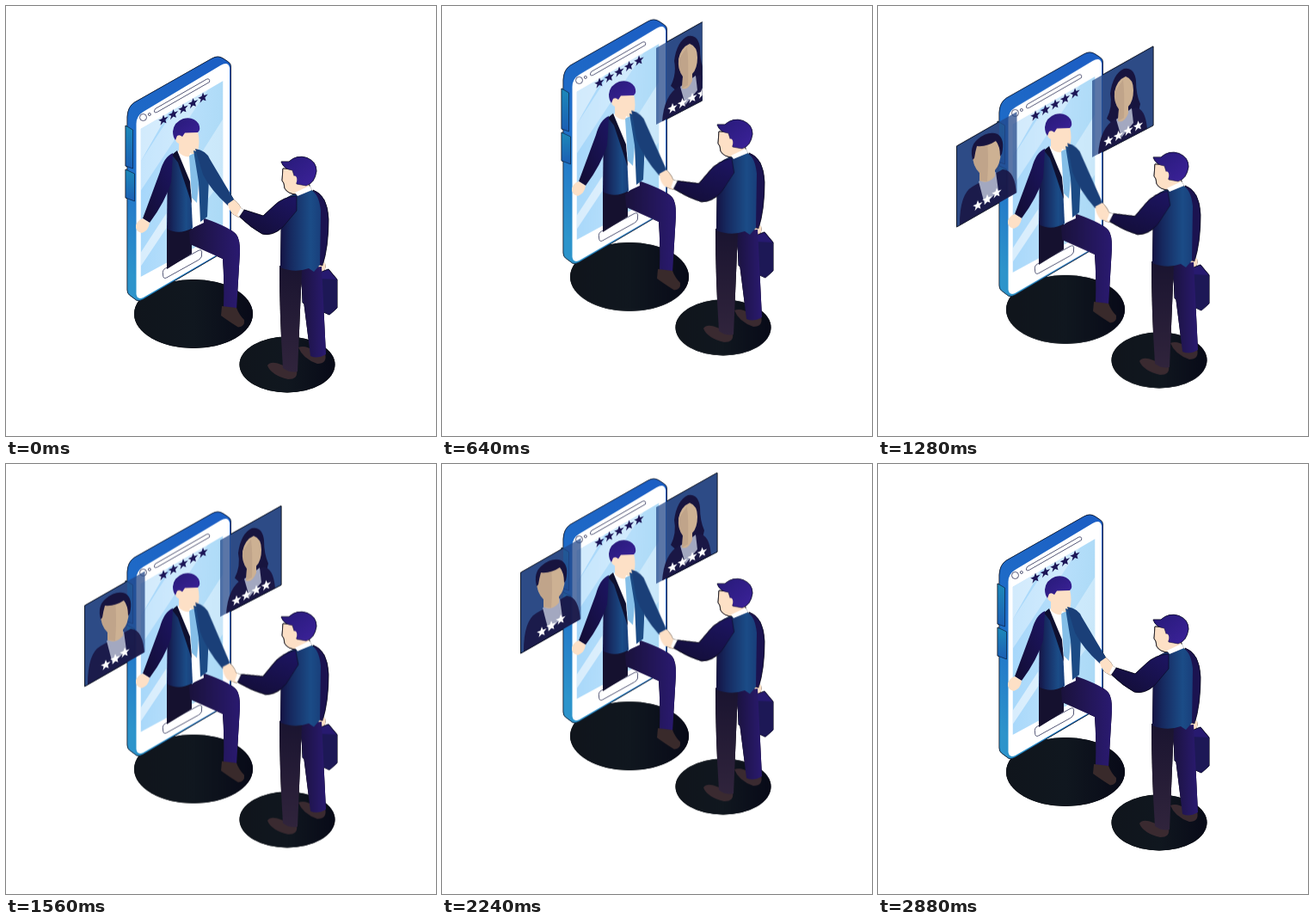
Write an HTML page that moves like this. It is 500 px wide and 500 px high and loops after 2.92 s.

```html
<!DOCTYPE html>
<html lang="en">
<head>
<meta charset="utf-8">
<title>Handshake through a phone</title>
<style>
html, body { margin: 0; width: 100%; height: 100%; overflow: hidden; background: #fff; }
.stage { position: absolute; left: 0; top: 0; width: 500px; height: 500px; filter: drop-shadow(0 0 .5px #000); }
svg { position: absolute; left: 0; top: 0; width: 500px; height: 500px; overflow: visible; }

.stage, .arm { animation: bob 2920ms cubic-bezier(.364, 0, .636, 1) infinite; }
.arm.near { animation-name: shakeNear; transform-origin: 228px 172px; }
.arm.far { animation-name: shakeFar; transform-origin: 332px 230px; }
.panel { animation: 2920ms linear infinite both; }
.panel.right { animation-name: wipeRight; }
.panel.left { animation-name: wipeLeft; }

@keyframes bob {
  0%, 49.315%, 98.63%, 100% { transform: translateY(0); }
  24.658%, 72.603% { transform: translateY(-44.5px); }
}
@keyframes shakeNear {
  0%, 32.877%, 65.753%, 98.63%, 100% { transform: rotate(0deg) scale(1); }
  16.438%, 49.315%, 82.192% { transform: rotate(9deg) scale(1.11); }
}
@keyframes shakeFar {
  0%, 32.877%, 65.753%, 98.63%, 100% { transform: rotate(0deg) scale(1); }
  16.438%, 49.315%, 82.192% { transform: rotate(-12.5deg) scale(1.12, 1); }
}
@keyframes wipeRight {
  0%, 14.384% { clip-path: inset(0 251px 0 0); animation-timing-function: ease-in-out; }
  26.027% { clip-path: inset(0 179px 0 0); }
  89.041% { clip-path: inset(0 179px 0 0); animation-timing-function: cubic-bezier(.33, 0, .67, .33); }
  98.63%, 100% { clip-path: inset(0 251px 0 0); }
}
@keyframes wipeLeft {
  0%, 24.658% { clip-path: inset(0 0 0 163px); animation-timing-function: ease-in-out; }
  35.616% { clip-path: inset(0 0 0 90px); }
  89.041% { clip-path: inset(0 0 0 90px); animation-timing-function: cubic-bezier(.33, 0, .67, .33); }
  98.63%, 100% { clip-path: inset(0 0 0 163px); }
}
</style>
</head>
<body>
<div class="stage">
<svg viewBox="0 0 500 500">
  <defs>
    <path id="star" transform="skewY(-20)" d="M0-6 1.5-2 5.7-1.9 2.4.8 3.5 4.9 0 2.5-3.5 4.9-2.4.8-5.7-1.9-1.5-2Z"/>
    <linearGradient id="body" x1=".7" y1="0" x2=".3" y2="1">
      <stop offset="0" stop-color="#1c5fc4"/><stop offset=".6" stop-color="#1f6ec8"/><stop offset="1" stop-color="#2d94cb"/>
    </linearGradient>
    <linearGradient id="button" x2="0" y2="1">
      <stop offset="0" stop-color="#1d8aba"/><stop offset="1" stop-color="#1b5eb4"/>
    </linearGradient>
    <linearGradient id="screen" x2="1" y2=".2">
      <stop offset="0" stop-color="#a0d4fa"/><stop offset=".6" stop-color="#b7dffb"/><stop offset="1" stop-color="#acdaf6"/>
    </linearGradient>
    <linearGradient id="coat">
      <stop offset="0" stop-color="#151344"/><stop offset=".25" stop-color="#16295f"/><stop offset=".75" stop-color="#1b4c87"/><stop offset="1" stop-color="#193f7b"/>
    </linearGradient>
    <linearGradient id="sleeve" x1="1" y1="0" x2="0" y2="1">
      <stop offset="0" stop-color="#1d1563"/><stop offset="1" stop-color="#120d33"/>
    </linearGradient>
    <linearGradient id="cloth">
      <stop offset="0" stop-color="#1a123c"/><stop offset="1" stop-color="#2a1a70"/>
    </linearGradient>
    <linearGradient id="trouser" x2="0" y2="1">
      <stop offset="0" stop-color="#1a1430"/><stop offset="1" stop-color="#30243c"/>
    </linearGradient>
    <linearGradient id="hair" x2="1" y2="1">
      <stop offset="0" stop-color="#271a78"/><stop offset="1" stop-color="#3c229a"/>
    </linearGradient>
    <linearGradient id="shade">
      <stop offset="0" stop-color="#10151c"/><stop offset=".5" stop-color="#10171f"/><stop offset="1" stop-color="#080a18"/>
    </linearGradient>
    <clipPath id="glass"><path d="M157 142 253 86V262L157 314Z"/></clipPath>
    <clipPath id="rightCard"><path d="M249 92 320 52V144L249 181Z"/></clipPath>
    <clipPath id="leftCard"><path d="M91.500 168 161.500 128V222L91.500 262Z"/></clipPath>
  </defs>

  <g fill="url(#shade)">
    <ellipse cx="218" cy="358" rx="69" ry="40"/>
    <ellipse cx="327" cy="417" rx="55.500" ry="32.500"/>
  </g>

  <!-- phone -->
  <g transform="translate(-.5 1)">
    <g stroke="#08142c" stroke-width=".6">
      <path fill="url(#body)" d="M141.500 128Q142 116 150 111L240 60Q247 56 253 60L259 64Q262 66 262 70V276Q262 280 257 283L160 340Q155 343 152 341L144 335Q141.500 333 141.500 329Z"/>
      <g fill="url(#button)">
        <path d="M139.500 138 148 143V188L139.500 185Z"/>
        <path d="M139.500 189 150 194V226L139.500 222Z"/>
      </g>
    </g>
    <path fill="#fff" d="M152 136Q152 127 160 122L250 68Q259 63 260.500 71V276Q260 281 255 283L160 338Q153 341 152 334Z"/>
    <g clip-path="url(#glass)">
      <path fill="url(#screen)" d="M150 80H260V320H150Z"/>
      <g fill="#fff">
        <path opacity=".5" d="M157 142 190 122 157 180Z"/>
        <path opacity=".35" d="M197 118 236 95 157 214V180ZM253 130V200L215 250V190Z"/>
        <path opacity=".55" d="M157 286 187 240V257L157 302Z"/>
      </g>
    </g>
    <g fill="#fff" stroke="#44486a" stroke-width=".9">
      <circle cx="160" cy="128.500" r="4"/>
      <circle cx="167.300" cy="125" r="1.500"/>
      <path d="M174 118.500 234 84Q238 83 237 87.500L176 122.500Q171 124 174 118.500Z"/>
      <path d="M183 311Q182 306 186 304L225 283Q229 282 228 287V290Q227 293 224 294.500L187 315Q183 317 183 311Z"/>
    </g>
    <g fill="#1b1556">
      <use href="#star" transform="translate(183.500 131.500)"/>
      <use href="#star" transform="translate(195 125)"/>
      <use href="#star" transform="translate(206.500 118.500)"/>
      <use href="#star" transform="translate(218 112)"/>
      <use href="#star" transform="translate(229.500 105.500)"/>
    </g>
  </g>

  <!-- man stepping out -->
  <path fill="#15112f" d="M187 255H216V288L187 306Z"/>
  <path fill="url(#cloth)" d="M213 262 231 247Q262 258 268 266Q272 271 272 286L268 353 253 350Q254 320 252 294L214 277Z"/>
  <path fill="#392a2b" d="M251 349 268 351Q271 359 277 365Q278 373 270 373.500Q258 366 250 360Z"/>
  <path fill="#fff" d="M198 170 206 165 222 172 230 252 217 258Z"/>
  <path fill="#85bfe8" d="M213 174 219 171 225 196 222 229 216 223Z"/>
  <path fill="#fde0c6" d="M197 151 206 145 223 146Q226 158 223 169Q219 174 214 171L213 175Q206 176 201 170L201 160Q196 158 197 151Z"/>
  <path fill="url(#hair)" d="M194 146Q195 135 206 131Q218 128 224 137Q227 144 223 147L208 147.500 205 152Q202 149 199 151L197 156Q194 152 194 146Z"/>
  <path fill="url(#coat)" d="M188 176 199 169 215 215 217 258Q201 267 187 259Z"/>
  <path fill="#0f1030" d="M193 173 199 168 214 204 216 230 203 191 200 182Z"/>
  <path fill="#1c4b85" d="M218 168 231 172 236 200 234 245 226 251 224 205Z"/>
  <path fill="url(#sleeve)" d="M194 171Q184 175 179 193L159 247 167 252Q185 228 192 205Z"/>
  <path fill="#fde0c6" d="M159 247 167 252Q166 261 158 264Q150 262 151 255Q153 249 159 247Z"/>

  <!-- visitor -->
  <path fill="#fde0c6" d="M363 298 371 299Q373 307 367 309Q362 306 363 298Z"/>
  <path fill="#271a70" stroke="#0b0b24" stroke-width=".7" d="M344 318 375 306 385 318V351L376 359 345 345Z"/>
  <path fill="#1d1856" d="M362 317 385 318V351L376 359 362 352Z"/>
  <path fill="#3a2a30" d="M340 397Q348 394 358 401L371 404Q374 416 362 416Q345 410 340 397Z"/>
  <path fill="url(#cloth)" d="M341 305 367 303 372 405Q362 411 354 407Q347 350 341 305Z"/>
  <path fill="#3a2a30" d="M304 418Q308 412 320 417L338 424Q340 434 328 434Q308 429 304 418Z"/>
  <path fill="url(#trouser)" d="M318 302 344 306 339 425Q330 427 322 421Q318 360 318 302Z"/>
  <path fill="#1b1350" stroke="#08081c" stroke-width=".5" d="M357 214Q374 220 375 248Q375 280 368 302L361 300 364 240Z"/>
  <path fill="url(#coat)" d="M322 226Q333 217 355 214Q364 219 366 238L365 301 358 309 352 305Q336 311 319 304L320 240Z"/>
  <path fill="#fde0c6" stroke="#0b0b18" stroke-width=".8" d="M322 189 336 190 352 205 354 214 339 219Q328 219 324 212L323 206 321 203Z"/>
  <path fill="#fff" d="M336 217 353 209 356 214 339 221Z"/>
  <path fill="url(#hair)" stroke="#12103c" stroke-width=".6" d="M320 181 329 181Q338 172.500 350 176.500Q361 181 361 192Q359 206 349 209L338 207 333 191Q323 190 320 181Z"/>
  <ellipse cx="335.500" cy="202" rx="2.800" ry="4.500" fill="#fde0c6"/>

  <!-- shaking arms -->
  <g class="arm near">
    <path fill="#1a3f78" d="M220 166Q233 168 237 178L265 225 258 232Q238 214 229 196Z"/>
    <path fill="#fde0c6" d="M258 230 265 225Q273 231 274 238Q271 245 265 243Q259 238 258 230Z"/>
  </g>
  <g class="arm far">
    <path fill="#fde0c6" d="M263 232Q270 232 276 237L271 246Q264 243 263 238Z"/>
    <path fill="#fff" d="M273 235 277 237 272 246 269 243Z"/>
    <path fill="url(#sleeve)" stroke="#08081c" stroke-width=".6" d="M338 221Q322 222 312 232L299 244 277 237 271.500 245Q285 258 298 265Q310 268 322 257L338 238Z"/>
  </g>
</svg>

<!-- cards: see-through only where they cover the phone -->
<svg class="panel right" viewBox="0 0 500 500">
  <g clip-path="url(#rightCard)">
    <path fill="#25498a" fill-opacity=".75" d="M249 50H261V190H249Z"/>
    <path fill="#2d4b86" d="M261 50H320V190H261Z"/>
    <path fill="#17143f" d="M266 136Q273 122 270 107Q273 84 286 78Q298 76 300 92Q300 108 305 119L302 132 275 144Z"/>
    <path fill="#1a1745" d="M256 178Q258 147 275 137L299 123Q311 124 313 148V152Z"/>
    <path fill="#a3a8c0" d="M277 137 295 124 297 141 283 158Z"/>
    <path fill="#cdb193" d="M275 105Q278 91 288 87Q297 90 297 103Q297 116 291 122V130Q286 142 279 139L280 125Q274 117 275 105Z"/>
    <path fill="#b89c84" opacity=".6" d="M285 91Q287 108 286 135L279 139 280 125Q274 117 275 105Z"/>
  </g>
  <path fill="none" stroke="#060c1c" stroke-width=".7" d="M261 85.200 320 52V144L261 174.700"/>
  <g fill="#fff">
    <use href="#star" transform="translate(268 162)"/>
    <use href="#star" transform="translate(279.500 156)"/>
    <use href="#star" transform="translate(291 150)"/>
    <use href="#star" transform="translate(302.500 144.500)"/>
  </g>
</svg>

<svg class="panel left" viewBox="0 0 500 500">
  <g clip-path="url(#leftCard)">
    <path fill="#2d4b86" d="M91 120H141V270H91Z"/>
    <path fill="#25498a" fill-opacity=".75" d="M141 120H162V270H141Z"/>
    <path fill="#1a1745" fill-opacity=".9" d="M95 264Q94 224 110 215L145 195Q160 196 161 226V264Z"/>
    <path fill="#a3a8c0" d="M117 209 137 198 140 220 124 236Z"/>
    <path fill="#cdb193" d="M110 178Q112 165 128 160Q143 160 143 175Q142 190 136 196V203Q128 213 118 208V199Q110 191 110 178Z"/>
    <path fill="#b89c84" opacity=".6" d="M110 178Q112 165 127 161Q129 185 127 209L118 208V199Q110 191 110 178Z"/>
    <path fill="#17143f" d="M110 184Q106 168 116 160Q128 150 139 154Q148 160 144 177L142 180Q142 168 137 162Q127 169 115 168Q113 175 112 182Z"/>
  </g>
  <path fill="none" stroke="#060c1c" stroke-width=".7" d="M141 139.700 91.500 168V262L141 233.700"/>
  <g fill="#fff">
    <use href="#star" transform="translate(116 237)"/>
    <use href="#star" transform="translate(127 230)"/>
    <use href="#star" transform="translate(138 222.500)"/>
  </g>
</svg>
</div>
</body>
</html>
```
